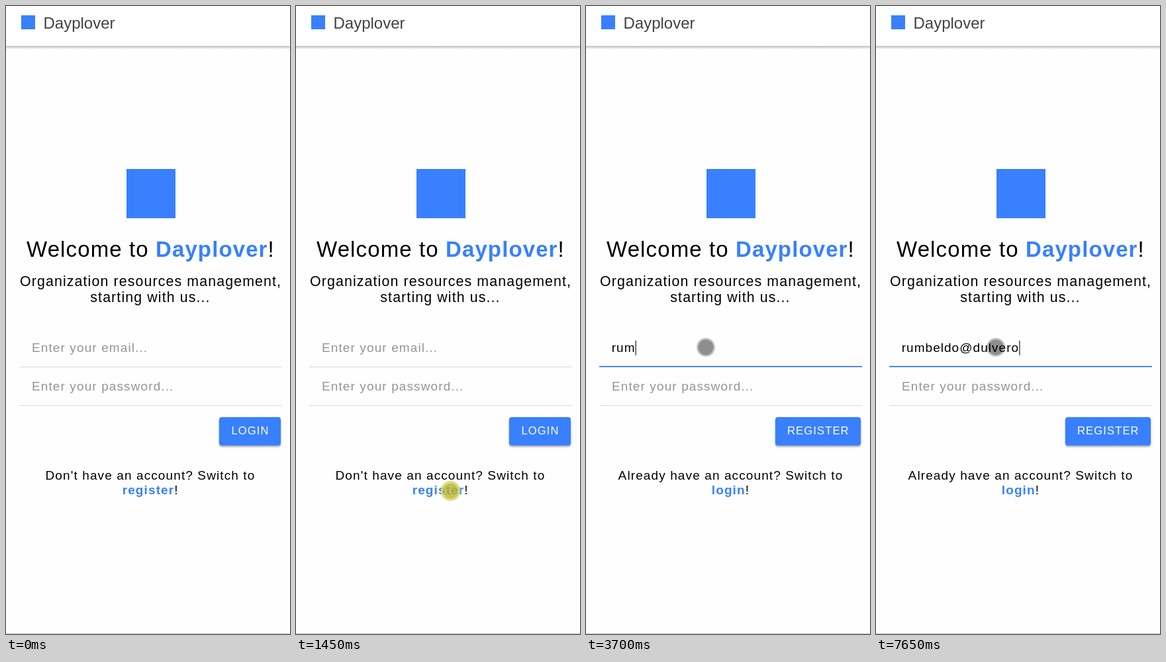
An HTML page for the animation above (8 s loop, 429 by 944 pixels).

```html
<!DOCTYPE html>
<html lang="en">
<head>
<meta charset="utf-8">
<title>Sign up</title>
<style>
  html, body { margin: 0; width: 100%; height: 100%; overflow: hidden; background: #fefefe; }
  svg { display: block; width: 429px; height: 944px; background: #fefefe; }
  text { font: 19px "Liberation Sans", Arial, sans-serif; letter-spacing: 1.11px; fill: #000; white-space: pre; }
  .brand { font-size: 24px; letter-spacing: 0; fill: #424242; }
  .title { font-size: 33px; }
  .sub { font-size: 21.375px; }
  .hint { fill: #959595; }
  .value { letter-spacing: 1.04px; }
  .label { font-size: 16.6px; fill: #fff; }
  .accent { font-weight: bold; fill: #3880ff; }
  .blue { fill: #3880ff; }
  .line { fill: #d9d9d9; }
  .button {
    fill: #3880ff;
    filter: drop-shadow(0 2px 1.2px rgba(0, 0, 0, .28)) drop-shadow(0 1px 2px rgba(0, 0, 0, .12));
  }
  #pointer { mix-blend-mode: multiply; }
  .ring { fill: #c3c3c3; r: 14px; }
  .core { fill: #8f8f8f; r: 11.5px; }
  #pointer.pressed { mix-blend-mode: normal; opacity: .8; }
  .pressed .ring { fill: #d8d666; r: 15px; }
  .pressed .core { fill: #b9b32c; }

  /* the form swaps its mode, then the email field takes focus */
  #login { animation: hide 8s step-end infinite; }
  #register { animation: swap 8s step-end infinite; }
  #focus { animation: focus 8s step-end infinite; }
  @keyframes hide { 20.125% { visibility: hidden; } }
  @keyframes swap { 0% { visibility: hidden; } 20.125% { visibility: visible; } }
  @keyframes focus { 0% { visibility: hidden; } 31.625% { visibility: visible; } }
</style>
</head>
<body>
<svg viewBox="0 0 429 944">
  <defs>
    <linearGradient id="shade" x1="0" y1="0" x2="0" y2="1">
      <stop offset="0" stop-color="#bdbdbd"/>
      <stop offset=".35" stop-color="#d2d2d2"/>
      <stop offset="1" stop-color="#fefefe"/>
    </linearGradient>
  </defs>

  <rect width="429" height="60" fill="#fff"/>
  <rect y="60" width="429" height="5" fill="url(#shade)"/>
  <rect class="blue" x="23" y="14" width="21" height="21"/>
  <text class="brand" x="56.5" y="34">Dayplover</text>

  <rect class="blue" x="182" y="245" width="74" height="74"/>
  <text class="title" x="31" y="377">Welcome to <tspan class="accent">Dayplover</tspan>!</text>
  <text class="sub" x="21" y="421">Organization resources management,</text>
  <text class="sub" x="127.3" y="445">starting with us...</text>

  <text class="hint" id="hint" x="39" y="520">Enter your email...</text>
  <text class="value" id="value" x="38.7" y="520"></text>
  <rect id="caret" y="503" width="1.2" height="22" fill="#222"/>
  <rect class="line" x="20" y="542" width="397" height="1"/>
  <rect id="focus" x="20" y="541" width="397" height="2" fill="#4a8af0"/>
  <text class="hint" x="39" y="578">Enter your password...</text>
  <rect class="line" x="20" y="600" width="397" height="1"/>

  <g id="login">
    <rect class="button" x="322" y="618" width="93" height="42.5" rx="4"/>
    <text class="label" x="340.5" y="644">LOGIN</text>
    <text x="59.5" y="712">Don't have an account? Switch to</text>
    <text x="175.7" y="734"><tspan class="accent">register</tspan>!</text>
  </g>
  <g id="register">
    <rect class="button" x="286" y="618" width="129" height="42.5" rx="4"/>
    <text class="label" x="304" y="644">REGISTER</text>
    <text x="48.6" y="712">Already have an account? Switch to</text>
    <text x="189.8" y="734"><tspan class="accent">login</tspan>!</text>
  </g>

  <rect y="943" width="429" height="1" fill="#c4c4c4"/>
  <g id="pointer">
    <circle class="ring"/>
    <circle class="core"/>
  </g>
</svg>
<script>
  const LOOP = 8000, ENTER = 380, FOCUS = 2530;
  const KEY_GAP = 80, BLINK = 475;
  // each burst of typing: start time and letters
  const BURSTS = [
    [3470, 'ru'], [3700, 'mb'], [3930, 'el'], [4550, 'do'], [5320, '@'],
    [5630, 'du'], [6240, 'l'], [6410, 'v'], [6720, 'er'], [7650, 'o']
  ];
  const KEYS = BURSTS.flatMap(([at, letters]) =>
    [...letters].map((letter, i) => ({ at: at + i * KEY_GAP, letter })));

  const el = id => document.getElementById(id);
  const show = (id, on) => { el(id).style.visibility = on ? 'visible' : 'hidden'; };
  const between = (t, from, to) => t >= from && t < to;

  // share of a move still to go, from 1 down to 0
  const left = (t, from, to) => 1 - Math.min(1, Math.max(0, (t - from) / (to - from)));

  function drawPointer(t) {
    const rise = left(t, ENTER, 990);
    const climb = left(t, 1950, 2450);
    const x = 181 + 52.5 * climb ** 2 + 151 * rise ** 3.3;
    const y = 513 + 216 * climb ** 1.3 + 207 * rise ** 2;
    show('pointer', t >= ENTER);
    el('pointer').setAttribute('transform', `translate(${x} ${y})`);
    el('pointer').classList.toggle('pressed', between(t, 1450, 1610) || between(t, FOCUS, 2610));
  }

  function drawField(t) {
    const typed = KEYS.filter(k => k.at <= t);
    const last = typed.length ? typed[typed.length - 1].at : FOCUS + KEY_GAP;
    const lit = t < last || Math.floor((t - last) / BLINK) % 2 === 0;
    const value = el('value');
    value.textContent = typed.map(k => k.letter).join('');
    show('hint', !typed.length);
    show('caret', t >= FOCUS && lit);
    el('caret').setAttribute('x', 38.8 + (typed.length ? value.getComputedTextLength() : 0));
  }

  const start = performance.now();
  function tick() {
    const t = (performance.now() - start) % LOOP;
    drawPointer(t);
    drawField(t);
    requestAnimationFrame(tick);
  }
  tick();
</script>
</body>
</html>
```
